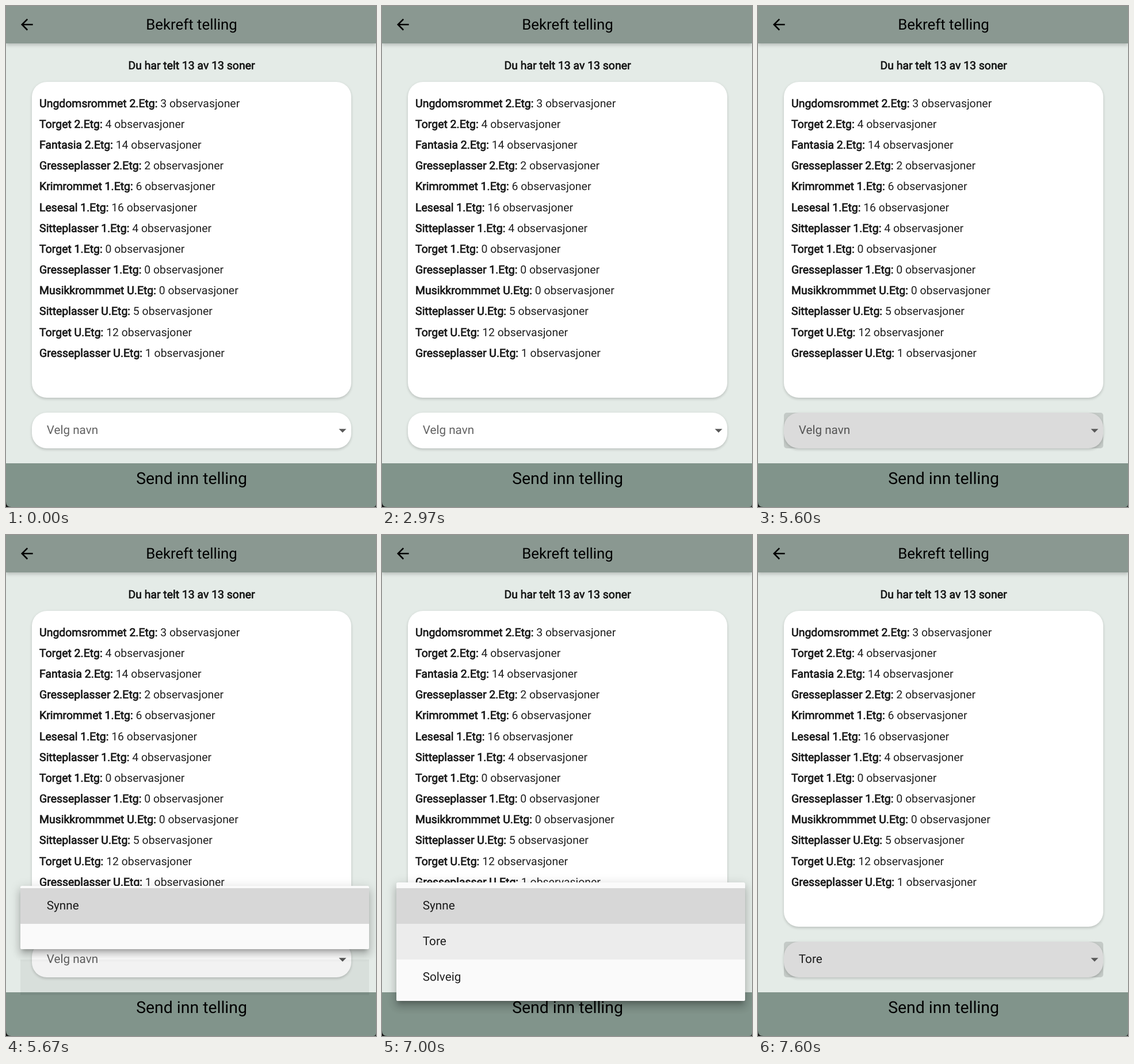
Write an HTML page that moves like this. It is 643 px wide and 871 px high and loops after 8000 ms.

```html
<!DOCTYPE html>
<html lang="nb">
<head>
<meta charset="utf-8">
<title>Bekreft telling</title>
<style>
  html, body { margin: 0; width: 100%; height: 100%; overflow: hidden; }
  #stage {
    position: relative; width: 643px; height: 871px; overflow: hidden;
    background: #e4ebe7; color: rgba(0, 0, 0, .88);
    font: 400 19.43px Roboto, sans-serif; white-space: pre;
    text-rendering: geometricPrecision;
  }
  #stage div, #stage svg { position: absolute; }
  .bold { -webkit-text-stroke: .72px currentColor; }
  .full { left: 0; width: 643px; text-align: center; text-indent: 2px; }
  .large { color: #000; }

  #header {
    top: 0; height: 65px; line-height: 66px; font-size: 25.83px; background: #8a9891;
    box-shadow: 0 3px 6px rgba(0,0,0,.2);
  }
  #count { top: 85.5px; line-height: 36px; }
  .card {
    left: 45px; width: 555.4px; background: #fff; border-radius: 25.8px;
    box-shadow: 0 2.6px 4px rgba(0,0,0,.13), 0 1px 6px rgba(0,0,0,.06);
  }
  #list { top: 131.8px; height: 549px; }
  .row { left: 13.1px; line-height: 36px; }
  #field { top: 706.8px; height: 62px; }
  #focus { left: 45px; top: 706.8px; width: 555.4px; height: 62px; border-radius: 5px; background: rgba(0,0,0,.14); }
  .entry { line-height: 62px; font-size: 20.667px; }
  #value { left: 70.8px; top: 707px; }
  #footer { top: 795px; height: 76px; background: #81948b; line-height: 53.6px; font-size: 28.42px; }

  #marks { left: 0; top: 0; }
  #strip { left: 24.6px; top: 738px; width: 606.5px; height: 62px; background: #000; }
  #menu {
    left: 24.6px; width: 606.5px; background: #fafafa; border-radius: 2.6px;
    box-shadow: 0 6.5px 6.5px -3.9px rgba(0,0,0,.2), 0 10.3px 13px 1.3px rgba(0,0,0,.14), 0 3.9px 18px 2.6px rgba(0,0,0,.12);
  }
  #clip { inset: 0; overflow: hidden; border-radius: inherit; }
  #items { left: 0; width: 100%; }
  .item { left: 0; width: 100%; height: 62px; }
  .item div { left: 46.2px; }
</style>
</head>
<body>
<div id="stage">
  <div id="header" class="full large">Bekreft telling</div>
  <div id="count" class="full bold">Du har telt 13 av 13 soner</div>
  <div id="list" class="card"></div>
  <div id="field" class="card"></div>
  <div id="focus"></div>
  <div id="value" class="entry"></div>
  <div id="footer" class="full large">Send inn telling</div>
  <svg id="marks" width="643" height="871">
    <path transform="translate(20.8 16.8) scale(1.2917)" d="M20 11H7.83l5.59-5.59L12 4l-8 8 8 8 1.41-1.41L7.83 13H20z"/>
    <path transform="translate(569.4 722.4) scale(1.2917)" d="M7 10l5 5 5-5z" fill="#595959"/>
    <path d="M0 862q0 9 9 9H0z" fill="#111"/>
    <path d="M643 866q0 5-5 5h5z" fill="#222"/>
  </svg>
  <div id="strip"></div>
  <div id="menu"><div id="clip"><div id="items"></div></div></div>
</div>
<script>
const LOOP = 8000, FRAME = 100 / 3;
const OPEN = 5567, CLOSE = 7500;
const MENU_TOP = 603.5, PAD = 10.3, ITEM = 62, MENU_HEIGHT = 206.6;
const zones = [
  ['Ungdomsrommet 2.Etg', 3], ['Torget 2.Etg', 4], ['Fantasia 2.Etg', 14],
  ['Gresseplasser 2.Etg', 2], ['Krimrommet 1.Etg', 6], ['Lesesal 1.Etg', 16],
  ['Sitteplasser 1.Etg', 4], ['Torget 1.Etg', 0], ['Gresseplasser 1.Etg', 0],
  ['Musikkrommmet U.Etg', 0], ['Sitteplasser U.Etg', 5], ['Torget U.Etg', 12],
  ['Gresseplasser U.Etg', 1]
];
const people = ['Synne', 'Tore', 'Solveig'];

const $ = id => document.getElementById(id);
const ramp = (t, from, to) => Math.min(1, Math.max(0, (t - from) / (to - from)));
const add = (parent, cls, top, html) => {
  const el = document.createElement('div');
  el.className = cls;
  el.style.top = top + 'px';
  el.innerHTML = html;
  parent.append(el);
  return el;
};

zones.forEach(([name, n], i) =>
  add($('list'), 'row', 19.9 + i * 36.17, `<span class="bold">${name}: </span>${n} observasjoner`));
const items = people.map((name, i) =>
  add($('items'), 'item', PAD + i * ITEM, `<div class="entry">${name}</div>`));
items[0].style.background = 'rgba(0,0,0,.14)';

function draw(t) {
  const fade = ramp(t, 5600, 5642) * (1 - ramp(t, CLOSE, 7595));
  const grow = ramp(t, OPEN + 75, OPEN + 150);
  const top = PAD * (1 - grow);
  const bottom = PAD + ITEM + (MENU_HEIGHT - PAD - ITEM) * grow;

  const menu = $('menu').style;
  menu.opacity = fade;
  menu.visibility = fade ? 'visible' : 'hidden';
  menu.top = MENU_TOP + top + 'px';
  menu.height = bottom - top + 'px';
  $('items').style.top = -top + 'px';

  // the pointer rests on the last entry, then moves to the middle one
  $('strip').style.opacity = .05 * ramp(t, 5600, 5660) * (1 - ramp(t, 5670, 5720));
  items[1].style.background = `rgba(0,0,0,${.055 * ramp(t, 5680, 5730)})`;
  for (const i of [1, 2]) {
    const start = OPEN + 183.3 + i * FRAME;
    items[i].firstChild.style.opacity = ramp(t, start, start + 50);
  }

  const focus = t < 5599 ? 0 : t < CLOSE ? 1 - ramp(t, 5602, 5660) : ramp(t, CLOSE, 7590);
  $('focus').style.opacity = focus;
  const chosen = t > CLOSE + 25;
  $('value').textContent = chosen ? people[1] : 'Velg navn';
  $('value').style.color = chosen ? 'rgba(0,0,0,.88)' : 'rgba(0,0,0,.62)';
}

function tick() {
  const t = performance.now() % LOOP;
  draw(Math.floor((t + 4) / FRAME) * FRAME);
  requestAnimationFrame(tick);
}
tick();
</script>
</body>
</html>
```
